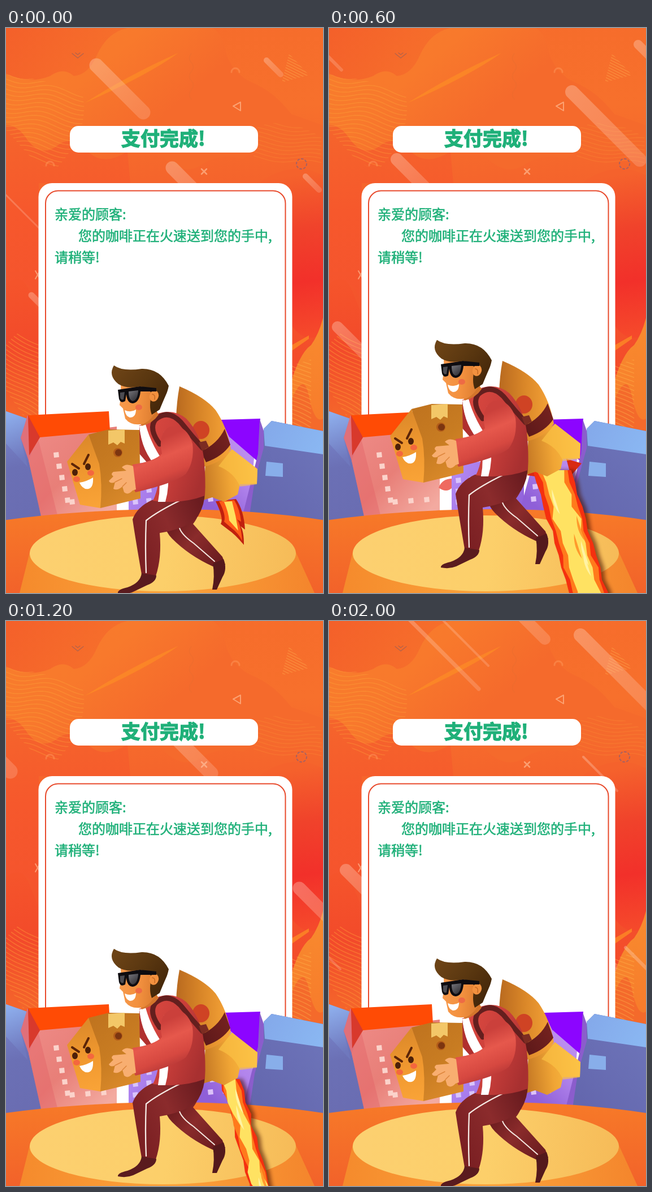
Recreate the animation shown at these times as an HTML page with a canvas. Size 561 by 998 pixels, loop 2070 ms.

```html
<!DOCTYPE html>
<html lang="zh">
<head>
<meta charset="utf-8">
<style>
html, body { margin: 0; width: 100%; height: 100%; overflow: hidden; background: #f7682c; }
canvas { display: block; width: 561px; height: 998px; }
</style>
</head>
<body>
<canvas id="stage" width="561" height="998"></canvas>
<script>
const g = document.getElementById('stage').getContext('2d');
const W = 561, H = 998, LOOP = 2070, STEP = 200 / 3;

const grad = (x0, y0, x1, y1, ...cols) => {
  const r = g.createLinearGradient(x0, y0, x1, y1);
  cols.forEach((c, i) => r.addColorStop(i / (cols.length - 1), c));
  return r;
};
const fill = (d, color) => { g.fillStyle = color; g.fill(new Path2D(d)); };
const line = (d, color, w = 2) => {
  g.strokeStyle = color; g.lineWidth = w;
  g.lineCap = g.lineJoin = 'round';
  g.stroke(new Path2D(d));
};
const oval = (x, y, rx, ry, color, a = 0) => {
  g.fillStyle = color; g.beginPath(); g.ellipse(x, y, rx, ry, a, 0, 7); g.fill();
};
const box = (x, y, w, h, r) => { g.beginPath(); g.roundRect(x, y, w, h, r); };
const rnd = (a, b) => { const v = Math.sin(a * 127.1 + b * 311.7) * 43758.5453; return v - Math.floor(v); };

// wavy parallel lines inside a clip shape
function waves(clip, x0, x1, y0, n, gap, amp, slope, color) {
  g.save(); g.clip(new Path2D(clip));
  g.strokeStyle = color; g.lineWidth = 1.6;
  for (let i = 0; i < n; i++) {
    g.beginPath();
    for (let x = x0; x <= x1; x += 5)
      g.lineTo(x, y0 + i * gap + (x - x0) * slope + amp * Math.sin(x / 19 + i * 0.16));
    g.stroke();
  }
  g.restore();
}

function backdrop() {
  g.fillStyle = grad(0, 0, 60, H, '#f66c2b', '#f7702c', '#f4602c', '#f4532c', '#f34a2a', '#f4582a', '#f5742c');
  g.fillRect(0, 0, W, H);
  fill('M0 0H215Q180 8 158 52Q143 84 119 84Q101 68 77 85Q38 101 0 80Z', grad(0, 0, 150, 90, '#f4602a', '#f66e2b'));
  fill('M0 82Q40 100 78 85Q102 68 120 85Q146 82 160 50Q178 8 215 0H365Q383 8 391 50Q406 84 437 97Q474 112 505 152L561 172V228Q520 210 491 224Q452 202 420 231Q375 220 344 243Q310 262 276 226Q244 198 215 218Q175 244 148 221Q116 188 92 207Q63 230 38 198Q20 170 0 172Z',
    grad(0, 30, 180, 240, '#f87d2c', '#f8792c', '#f56a2c'));
  fill('M0 172Q20 170 38 198Q63 230 92 207Q116 188 148 221Q175 244 215 218L220 274H58V480Q30 430 0 452Z', grad(0, 180, 0, 470, '#f5642c', '#f6582c', '#f5542d'));
  fill('M440 280Q500 230 561 260V540Q530 560 505 525Z', grad(510, 260, 550, 540, '#f5622c', '#f0432b', '#f2302a', '#f5492b'));
  fill('M0 452Q28 432 40 462T60 510V690H0Z', grad(0, 450, 0, 680, '#f5542b', '#f24a2a', '#f4642b'));
  fill('M500 640Q518 575 540 560Q554 540 561 512V720H500Z', grad(520, 530, 545, 710, '#f88a2e', '#f77a2b'));
  fill('M500 670Q526 600 536 650T561 690V720H500Z', '#f46a2b');
  waves('M0 82Q70 90 135 115Q150 180 92 245Q70 255 38 222L0 180Z', 0, 145, 72, 23, 8, 6, .15, 'rgba(255,173,62,.3)');
  waves('M440 178Q490 150 561 195V240H438Z', 438, 561, 165, 10, 7, 4, .1, 'rgba(255,160,60,.2)');
  waves('M0 560Q30 520 58 540V684H30L0 640Z', 0, 60, 525, 22, 8, 4, .6, 'rgba(255,145,55,.5)');
  waves('M506 596L540 585V705H506Z', 505, 545, 570, 18, 8, 3, .5, 'rgba(255,190,80,.35)');
  waves('M501 45L536 83L488 96Z', 485, 540, 30, 16, 5, 0, .5, 'rgba(255,180,80,.35)');
  fill('M140 132Q215 84 305 44Q250 84 140 132Z', 'rgba(255,145,35,.6)');
  fill('M506 560L536 543V549L506 570Z', 'rgba(255,150,35,.65)');
  const soft = 'rgba(255,190,150,.65)';
  line('M346 249l9 9m0-9l-9 9', soft, 2.5);
  line('M52 429l8 14m0-14l-8 14', soft, 2);
  line('M415 131V146L402 138Z', soft, 2);
  line('M328 45q-7 9 0 16t0 16t0 16t0 16t0 17', 'rgba(225,110,50,.35)', 1.5);
  line('M399 78a7 7 0 0 1 14 0M71 243a7 7 0 0 1 14 0', 'rgba(255,160,100,.4)', 3);
  line('M117 45l10 8l10-8m-14-1l4 3l4-3', 'rgba(150,95,90,.7)', 1.3);
  g.setLineDash([3, 4]);
  line('M532 240a9 9 0 1 1-18 0a9 9 0 1 1 18 0', 'rgba(150,95,110,.8)', 2);
  g.setLineDash([]);
}

// phase, tail x, tail y, run, width, speed per step
const bars = [
  [0, 160, 66, 83, 25, 80], [0, 461, 57, 25, 10, 80], [0, 294, 247, 75, 23, 150],
  [0, 530, 262, 24, 10, 150], [0, 45, 472, 30, 11, 80], [0, -60, 235, 120, 3, 120],
  [4, 35, 293, 110, 26, 55], [4, 495, -45, 50, 22, 25], [4.5, -60, 51, 77, 26, 80],
  [9, 430, 113, 120, 24, 80], [9, 120, 232, 55, 22, 72], [9, -60, -8, 82, 6, 130],
  [9, 15, 528, 55, 20, 76], [9, 547, 29, 50, 16, 80], [14, 310, -40, 132, 20, 120],
  [14, 497, 77, 130, 24, 104], [14, -60, 417, 84, 22, 80], [13.5, 30, 440, 60, 22, 80],
  [14, 170, -33, 202, 4, 180], [13.5, 100, -45, 165, 7, 160], [14, 500, 290, 60, 4, 100],
  [14, -50, 545, 120, 4, 100]
];
const CYCLE = 16.5;
function streaks(k) {
  g.lineCap = 'round';
  for (const [p, x, y, run, w, v] of bars) {
    const d = ((k - p + CYCLE * 1.5) % CYCLE - CYCLE / 2) * v;
    g.strokeStyle = grad(x + d, y + d, x + d + run, y + d + run, 'rgba(255,222,205,.33)', 'rgba(255,205,185,.24)');
    g.lineWidth = w;
    g.beginPath(); g.moveTo(x + d, y + d); g.lineTo(x + d + run, y + d + run); g.stroke();
  }
}

function text(str, x, y, font, weight) {
  g.font = font + ' "Noto Sans CJK SC", "Noto Sans CJK", "Noto Sans CJK JP", sans-serif';
  g.fillStyle = g.strokeStyle = '#1fb079';
  g.lineWidth = weight; g.lineJoin = 'miter';
  g.fillText(str, x, y);
  g.strokeText(str, x, y);
}

function card() {
  g.fillStyle = '#fff';
  box(113, 173, 333, 47, 15); g.fill();
  box(57.5, 274, 449, 640, 24); g.fill();
  g.strokeStyle = '#e84a2c'; g.lineWidth = 2;
  box(70, 287.5, 424.5, 610, 22); g.stroke();
  text('支付完成!', 204, 208, '900 34px', 1.3);
  text('亲爱的顾客:', 86, 338, '400 24px', .6);
  text('您的咖啡正在火速送到您的手中,', 128, 376, '400 24px', .6);
  text('请稍等!', 86, 414, '400 24px', .6);
}

function windows(x, y, cols, rows, dx, dy, skew, color) {
  for (let i = 0; i < cols; i++) for (let j = 0; j < rows; j++) {
    const a = x + i * dx + j * skew, b = y + j * dy - i * 2;
    fill(`M${a} ${b}l9-1l1 9l-9 1Z`, color);
  }
}

function town() {
  fill('M0 677L37 690L63 864V880H0Z', grad(0, 690, 40, 860, '#7c8ad0', '#6b70b5', '#6a6db2'));
  fill('M0 677L37 690L26 724L38 775L0 734Z', grad(0, 680, 30, 760, '#8fb0ee', '#6f78bd'));
  fill('M38 684L26 724L45 778L60 724Z', '#e0707a');
  fill('M40 764L56 722L196 704V880H66Z', grad(45, 720, 180, 850, '#ee8a86', '#e87f78', '#f3aaa0'));
  fill('M56 722L40 764L66 880H96Z', 'rgba(225,95,100,.4)');
  fill('M39 684L182 677L184 712L60 723L42 752Z', '#ff4b05');
  fill('M39 684L41 755L60 723Z', '#d8392c');
  windows(84, 750, 1, 5, 24, 20, 5, '#fbd3cb');
  windows(112, 833, 3, 1, 28, 18, 0, '#fbd3cb');
  fill('M194 812Q200 796 218 796V812Q208 822 194 812Z', '#ef6a60');
  fill('M217 770L345 760V880H217Z', grad(217, 780, 340, 840, '#b48af3', '#9264dc'));
  windows(224, 795, 2, 3, 24, 19, 0, '#d9c4fb');
  fill('M330 880L380 700L441 738L428 880Z', grad(340, 820, 435, 720, '#8f5fd8', '#b184ec', '#c295f0'));
  fill('M380 692L450 690L446 766L395 722Z', '#8c05ff');
  fill('M449 691L461 726L432 880H414L446 752Z', '#8b5dcc');
  windows(360, 806, 2, 2, 26, 22, -3, '#dcc2f8');
  fill('M456 742V708L470 694L561 712V880H428L440 800Z', grad(440, 840, 555, 730, '#6467ae', '#6d74b9'));
  fill('M456 708L470 694L561 712V753L458 738Z', grad(460, 700, 555, 750, '#84a9ea', '#8ab7f2'));
  fill('M461 766L490 769V793L459 791Z', '#88aeea');
}

function ground() {
  fill('M0 869Q130 851 280 850T561 869V998H0Z', grad(0, 850, 0, 998, '#f77a28', '#f2622a'));
  fill('M42 926L24 998H546L513 926Z', grad(24, 0, 546, 0, '#f58a2c', '#fba43b', '#f4852c'));
  oval(277.5, 928, 235.5, 67, grad(60, 900, 510, 960, '#fcd070', '#fccf6a', '#f6bb58'));
}

// jagged plume from the nozzle (x, y), len long
function plume(x, y, len, w0, w1, hot, k) {
  const slope = .29, n = 12;
  const layer = (scale, color, jag, seed) => {
    const pts = [];
    for (let s = -1; s <= 1; s += 2) for (let j = 0; j <= n; j++) {
      const i = s < 0 ? j : n - j, u = i / n;
      const half = (w0 + (w1 - w0) * u) * scale / 2 + (rnd(i + seed, k * s) - .5) * jag;
      pts.push([x + u * len * slope + s * half, y + u * len]);
    }
    g.fillStyle = color; g.beginPath();
    pts.forEach(p => g.lineTo(...p)); g.closePath(); g.fill();
  };
  g.save();
  g.shadowColor = 'rgba(70,15,0,.6)'; g.shadowBlur = 7; g.shadowOffsetX = 6;
  layer(1, '#f5300f', 8, 1);
  g.restore();
  layer(.8, '#ff7a1c', 8, 5);
  layer(hot, '#ffe262', 12, 9);
  for (let i = 0; i < 5; i++) {
    const u = rnd(i, k + 3) * .8, a = x + u * len * slope + (rnd(k, i) - .5) * w1 * .6, b = y + u * len;
    fill(`M${a} ${b}q5 15 14 44q-15-18-14-44Z`, i % 2 ? '#ff9a2c' : '#fff3a4');
  }
}

function flame(k, dy) {
  if (k === 0) {
    fill('M371 836Q386 866 380 876L393 886Q405 894 421 913Q421 888 415 880L423 886Q421 852 407 832Z', '#c0200e');
    fill('M377 836Q390 860 386 872L400 884Q411 892 418 906Q416 878 409 868L416 872Q414 850 404 834Z', '#ff5a18');
    fill('M386 837Q394 856 395 870L411 888Q407 862 400 836Z', '#ffe05c');
  } else if (k < 19) {
    const len = k < 3 ? 80 + k * 45 : 240 - dy * .4;
    const end = k > 16 ? 1 - (k - 16) * .25 : 1;
    if (k > 2 && k < 17) fill(`M365 ${822 + dy}L350 ${835 + dy}L372 ${838 + dy}ZM420 ${806 + dy}L${k > 11 ? 477 : 447} ${(k > 11 ? 793 : 814) + dy}L428 ${836 + dy}Z`, '#d92a12');
    plume(396, 826 + dy, len, 66 * end, (k < 3 ? 20 : 70) * end, Math.min(.6, .3 + k * .04), k);
  } else if (k < 25) {
    g.save(); g.translate((k - 21) * 9, (k - 21) * 26);
    const thin = k > 22 ? .5 : 1;
    const a = 'M392 806Q403 829 415 832Q426 846 413 868';
    const b = 'M401 878Q394 903 409 927T443 949Q466 947 466 934Q494 948 482 980Q474 998 448 991';
    [['#8f1c0c', 26], ['#f03012', 22], ['#ff8420', 13], ['#ffe45e', 6]].forEach(([c, w]) => {
      line(a, c, w * thin); line(b, c, w * thin);
    });
    g.restore();
  } else if (k < 29) {
    g.save(); g.translate((k - 26) * 8, (k - 26) * 28);
    const drops = 'M403 842l5-2l2 8l-5 3ZM410 860l3 5l-3 5ZM400 906l8-1l6 5l17 1l-5 8l-12 2l-12 2l5-8ZM394 938l5 2l-2 5ZM418 957l4 5l-5 3ZM408 984l8 2l-2 7l-6-2ZM499 967l7 10l3 18l-9-7Z';
    fill(drops, '#f03a14'); line(drops, '#a31810', 1.5);
    line('M407 911l17 3', '#ff8a28', 2);
    g.restore();
  }
}

function rocket() {
  fill('M353 766Q374 768 400 744L445 779L444 805L414 806L410 824L386 837L365 829L349 834Z', grad(352, 800, 440, 790, '#c87b25', '#f0a535', '#fcc044'));
  fill('M400 744L445 779L444 806L414 810Q404 785 376 774Z', 'rgba(252,196,70,.65)');
  fill('M307 633Q352 652 371 675Q391 704 398 744Q382 768 350 775Q306 724 301 690Q302 660 307 633Z', grad(300, 690, 390, 690, '#b8691f', '#d98628', '#f3a136'));
  oval(345, 710, 15, 16, '#cf4324');
  fill('M345 748Q375 734 387 708L397 736Q383 757 354 767Z', grad(345, 760, 395, 725, '#5c1819', '#74221f'));
}

function legs() {
  fill('M286 840L350 826Q344 860 331 876L383 934L388 948L366 951Q324 932 294 902Q270 878 286 840Z', grad(290, 860, 380, 940, '#64191c', '#8a2b2b', '#6b1d1f'));
  line('M306 880Q309 894 332 910L369 942', '#f4e6df', 2);
  fill('M366 946L385 938Q392 956 383 970L373 992H365Q370 968 366 946Z', '#54191c');
  fill('M258 834L352 818Q352 842 340 862Q322 884 272 892Q276 936 265 968L240 965Q229 902 224 868Q232 846 258 834Z', grad(225, 900, 345, 845, '#7b2023', '#8b2b2c', '#6b1c20'));
  line('M309 834Q268 854 248 870Q246 916 248 962', '#f6ebe5', 2.3);
  fill('M240 963L266 967Q266 978 250 984L225 996Q213 1001 198 998Q197 992 215 988Q238 980 240 963Z', '#5a1b1e');
}

function jacket() {
  fill('M236 702Q252 698 266 682Q296 671 319 690Q344 716 350 758Q354 798 352 826Q310 842 260 835Q274 806 268 776Q238 752 236 702Z', grad(240, 740, 352, 780, '#d8473f', '#c83e3a', '#a83030'));
  fill('M236 703L247 700Q258 740 286 776Q290 810 282 837H269Q275 806 268 778Q240 752 236 703Z', '#fff');
  fill('M236 704Q240 748 268 777L250 768L236 752Z', '#b0302f');
}

function strap() {
  line('M272 735Q252 708 264 692Q286 672 309 696Q328 720 348 742', '#641f1e', 9);
  fill('M341 732L354 729L359 740L347 747Z', '#7c2c22');
  fill('M279 714L298 707L302 713L284 722Z', '#fff');
}

function carton() {
  fill('M146 718L182 709L236 710L238 831L167 848L164 772Z', grad(155, 720, 238, 830, '#c0741f', '#c87c22', '#dc8b2b'));
  fill('M146 718L108 766L131 842L167 848Q171 805 165 770Z', grad(125, 730, 150, 845, '#dd8a2a', '#f0982f', '#f9a337'));
  fill('M181 711L210 709V734L203 731L197 737L190 732L181 736Z', '#f3c768');
  oval(198, 750, 8, 8, '#b35c19'); oval(199, 750, 6, 6, '#7c3510');
  line('M117 770L129 778M138 770L146 754', '#5c2508', 4);
  oval(122, 785, 5, 6, '#4d2008'); oval(145, 775, 5, 6, '#4d2008');
  oval(125, 797, 6, 5, '#f4673e'); oval(150, 786, 6, 5, '#f4673e');
  fill('M130 803Q143 801 154 794Q155 812 146 814Q136 816 130 803Z', '#fff');
}

function arm() {
  fill('M290 704Q320 700 330 734Q334 766 318 788Q296 805 229 820Q218 800 224 771Q262 766 276 752Q268 716 290 704Z', grad(265, 730, 300, 815, '#cb403b', '#e6584c', '#d64840', '#a93032'));
  fill('M225 774Q212 768 205 776L213 782L190 784Q184 788 190 792L182 800Q185 806 193 802L190 814Q197 818 206 810L209 820Q216 826 224 817L230 815Z', '#f8ae70');
  line('M193 802L205 796M206 810L213 803', '#dd853d', 1.5);
}

function head() {
  fill('M232 680L262 668L270 683Q260 698 240 703Z', '#d4752b');
  fill('M203 628H268V668Q262 690 244 699Q222 704 211 690L207 672L201 666Q204 650 203 628Z', grad(205, 660, 265, 665, '#f6984a', '#f3913f', '#dc7c30'));
  fill('M191 596Q206 607 240 602Q272 601 288 632Q286 642 283 648Q276 664 272 674L258 683Q252 668 258 645Q248 634 238 633Q214 638 199 629Q180 614 191 596Z', grad(200, 600, 275, 665, '#6c4316', '#5a3710', '#46280a'));
  oval(262, 650, 8, 10, '#f3913f', .3);
  line('M259 647q6 1 4 9', '#c66a25', 1.5);
  fill('M198 639L237 633L266 636V642L238 642Q236 662 224 663Q214 662 213 647L211 659Q203 664 200 655Z', '#0e0c10');
  fill('M202 644L210 643L208 656Q204 658 202 653Z', '#4d4c52');
  fill('M217 642L234 640Q233 658 224 659Q217 657 217 642Z', grad(217, 641, 233, 660, '#75747a', '#29282d'));
  oval(235, 670, 6, 5, '#ee6b45');
  fill('M210 675Q221 680 230 674Q230 688 219 688Q212 686 210 675Z', '#fff');
}

const bob = [0, -3, -9, -17, -26, -34, -41, -45, -47, -45, -39, -31, -21, -11, -4];

function draw(k) {
  const dy = bob[k % 15];
  backdrop();
  streaks(k);
  card();
  town();
  ground();
  flame(k, dy);
  g.save();
  g.translate(0, dy);
  [rocket, legs, jacket, strap, head, carton, arm].forEach(part => part());
  g.restore();
}

const start = performance.now();
let shown = -1;
function tick() {
  const t = Math.max(0, performance.now() - start) % LOOP;
  let k = Math.floor((t + 5) / STEP);
  if (Math.round(k * STEP / 10) * 10 > t) k--;
  k = Math.max(0, Math.min(30, k));
  if (k !== shown) draw(shown = k);
  requestAnimationFrame(tick);
}
tick();
</script>
</body>
</html>
```
